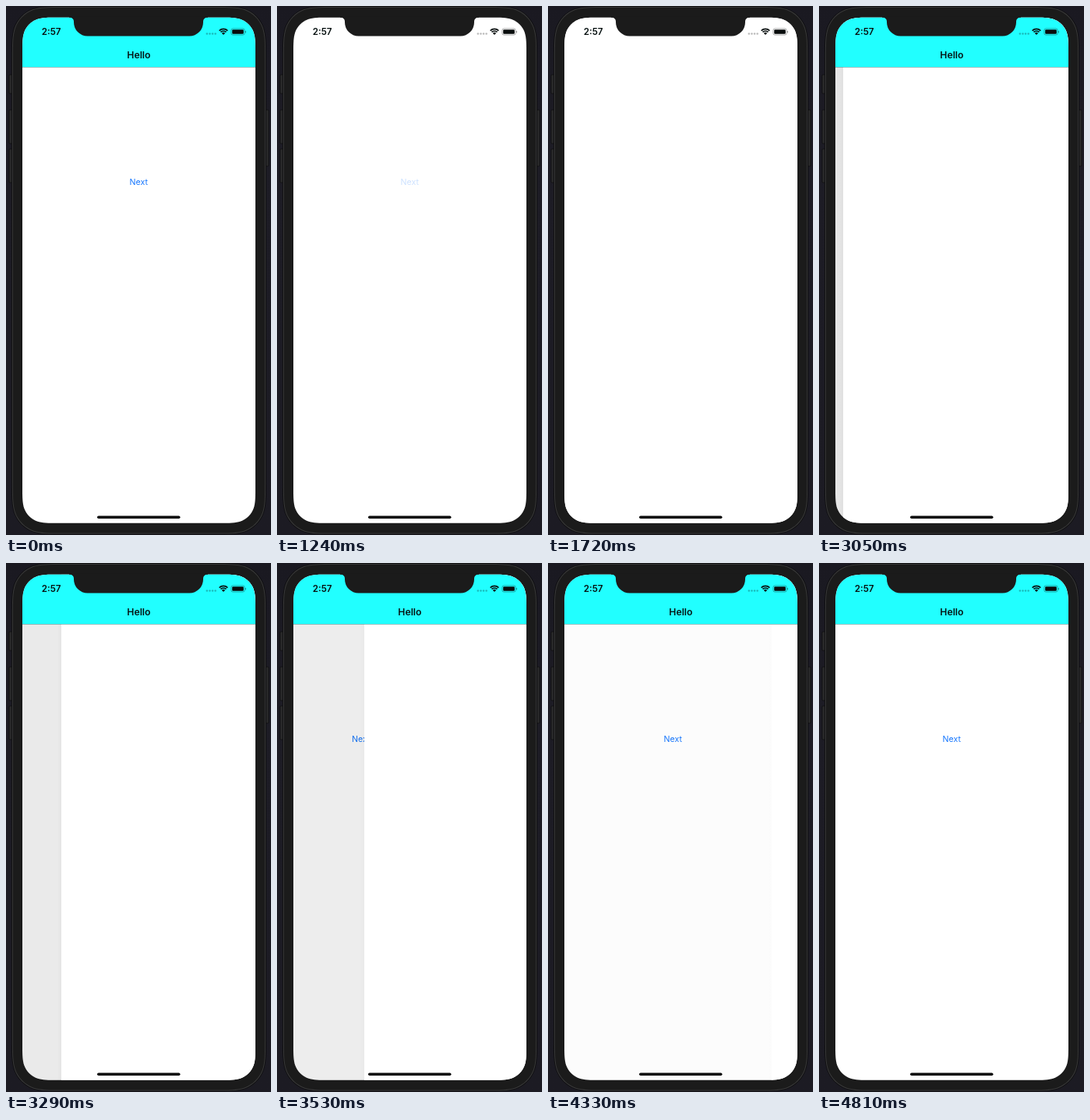
Animation, 340 px wide and 677 px high, one loop 5.06 s. Source, as an HTML page with a canvas:

```html
<!DOCTYPE html>
<html lang="en">
<head>
<meta charset="utf-8">
<title>Navigation swipe</title>
<style>
  html, body { margin: 0; width: 100%; height: 100%; overflow: hidden; background: #1c1b23; }
  canvas { display: block; width: 340px; height: 677px; }
</style>
</head>
<body>
<canvas id="stage"></canvas>
<script>
const W = 340, H = 677, LOOP = 5060, STEP = 80;
const PUSH = 1240, SWIPE = 3050, RELEASE = 4090, DONE = 4810;
const SCREEN = { x: 21, y: 14.7, w: 299, h: 647.1, r: 30 };
const BAR_BOTTOM = 78.2;
const FONT = 'Inter, Roboto, "Liberation Sans", sans-serif';

const canvas = document.getElementById('stage');
const ctx = canvas.getContext('2d');
const dpr = window.devicePixelRatio || 1;
canvas.width = W * dpr;
canvas.height = H * dpr;

// Finger drag: [ms since swipe start, page offset]
const DRAG = [[0, 10], [240, 50], [480, 91], [640, 131], [800, 158], [1040, 187]];

function dragAt(ms) {
  let i = 1;
  while (i < DRAG.length - 1 && ms > DRAG[i][0]) i++;
  const [t0, x0] = DRAG[i - 1], [t1, x1] = DRAG[i];
  return x0 + (x1 - x0) * (ms - t0) / (t1 - t0);
}

// cubic-bezier(.36, .66, .04, 1)
function pushEase(x) {
  if (x <= 0 || x >= 1) return x <= 0 ? 0 : 1;
  const bez = (u, a, b) => 3 * u * (1 - u) * (1 - u) * a + 3 * u * u * (1 - u) * b + u * u * u;
  let lo = 0, hi = 1;
  for (let i = 0; i < 24; i++) {
    const mid = (lo + hi) / 2;
    if (bez(mid, 0.36, 0.04) < x) lo = mid; else hi = mid;
  }
  return bez(lo, 0.66, 1);
}

function stateAt(t) {
  const w = SCREEN.w;
  if (t < PUSH || t >= DONE) return { bar: true, offset: w, ink: 1 };
  if (t < SWIPE) {
    const k = Math.min(Math.floor((t - PUSH) / STEP) / 6, 1);
    return { bar: false, offset: w * (1 - pushEase(k)), ink: 0.22 + 0.78 * k };
  }
  const ms = Math.floor((t - SWIPE) / STEP) * STEP;
  const drag = RELEASE - SWIPE;
  if (ms <= drag) return { bar: true, offset: dragAt(ms), ink: 1 };
  const left = 1 - (ms - drag) / (DONE - RELEASE);
  return { bar: true, offset: w - (w - dragAt(drag)) * left ** 3, ink: 1 };
}

function rect(x, y, w, h, color) {
  ctx.fillStyle = color;
  ctx.fillRect(x, y, w, h);
}

function rounded(x, y, w, h, r) {
  ctx.beginPath();
  ctx.roundRect(x, y, w, h, r);
}

function pill(x, y, w, h, r, color) {
  rounded(x, y, w, h, r);
  ctx.fillStyle = color;
  ctx.fill();
}

// Rounded box whose curvature eases in along each side
function smooth(x, y, w, h, r) {
  const corner = (cx, cy, ax, ay, bx, by) => {
    const p = (a, b) => [cx + (ax * a + bx * b) * r, cy + (ay * a + by * b) * r];
    ctx.lineTo(...p(1.529, 0));
    ctx.bezierCurveTo(...p(1.088, 0), ...p(0.868, 0), ...p(0.631, 0.075));
    ctx.bezierCurveTo(...p(0.373, 0.169), ...p(0.169, 0.373), ...p(0.075, 0.631));
    ctx.bezierCurveTo(...p(0, 0.868), ...p(0, 1.088), ...p(0, 1.529));
  };
  ctx.beginPath();
  corner(x, y, 0, 1, 1, 0);
  corner(x + w, y, -1, 0, 0, 1);
  corner(x + w, y + h, 0, -1, -1, 0);
  corner(x, y + h, 1, 0, 0, -1);
  ctx.closePath();
}

function text(str, x, y, size, weight, color) {
  ctx.font = `${weight} ${size}px ${FONT}`;
  ctx.textAlign = 'center';
  ctx.fillStyle = color;
  ctx.fillText(str, x, y);
}

function drawBody() {
  const bg = ctx.createLinearGradient(0, 0, 0, H);
  bg.addColorStop(0, '#1a1921');
  bg.addColorStop(0.3, '#1d1c25');
  bg.addColorStop(1, '#1c1b23');
  rect(0, 0, W, H, bg);

  const button = (x, y, h) => {
    pill(x, y, 5, h, 1, '#29292a');
    ctx.strokeStyle = '#0c0c0d';
    ctx.lineWidth = 0.7;
    ctx.stroke();
  };
  button(4, 88, 24);
  button(4, 133, 43);
  button(4, 183, 43);
  button(332, 133, 72);

  const shell = (inset, color) => {
    smooth(7 + inset, inset, 327 - 2 * inset, 676.5 - 2 * inset, 43.5 - inset);
    ctx.fillStyle = color;
    ctx.fill();
  };
  shell(0, '#0e0e0f');
  shell(0.9, '#39393a');
  shell(1.9, '#1b1b1b');
}

function drawPages(s) {
  const { x, y, w, h } = SCREEN;
  const away = 1 - s.offset / w;
  rect(x - 1, y - 1, w + 2, h + 2, '#fff');
  if (away < 1) {
    ctx.globalAlpha = s.ink;
    text('Next', 170.2 - 0.3 * w * away, 229, 10.6, 400, '#1576fe');
    ctx.globalAlpha = 1;
  }
  if (away > 0) {
    const edge = x + s.offset;
    rect(x, y, s.offset, h, `rgba(0,0,0,${0.1 * away})`);
    if (s.offset > 0) {
      const shade = ctx.createLinearGradient(edge - 6, 0, edge, 0);
      shade.addColorStop(0, 'rgba(0,0,0,0)');
      shade.addColorStop(1, `rgba(0,0,0,${0.03 * away})`);
      rect(edge - 6, y, 6, h, shade);
    }
    rect(edge, y, w - s.offset + 1, h, '#fff');
  }
  if (s.bar) {
    rect(x, y - 1, w, BAR_BOTTOM - y + 1, '#21ffff');
    rect(x, BAR_BOTTOM - 0.2, w, 0.8, 'rgba(0,0,0,.3)');
    text('Hello', 170.4, 67, 12.2, 600, '#061616');
  }
}

function drawNotch() {
  const top = SCREEN.y, bottom = 38.5;
  ctx.beginPath();
  ctx.moveTo(81, top - 1);
  ctx.lineTo(81, top);
  ctx.arcTo(87, top, 87, 22, 5);
  ctx.arcTo(87, bottom, 110, bottom, 17.5);
  ctx.arcTo(253, bottom, 253, 22, 17.5);
  ctx.arcTo(253, top, 259, top, 5);
  ctx.lineTo(259, top);
  ctx.lineTo(259, top - 1);
  ctx.fillStyle = '#1b1b1b';
  ctx.fill();
}

function drawStatus() {
  text('2:57', 58.2, 37, 11.6, 600, '#061010');

  for (let i = 0; i < 4; i++) pill(256.6 + i * 3.6, 34.3, 2.5, 2.5, 1.25, 'rgba(0,0,0,.27)');

  // Wi-Fi: two arcs over a wedge
  const cx = 279, cy = 37;
  const from = -Math.PI * 0.75, to = -Math.PI * 0.25;
  ctx.strokeStyle = ctx.fillStyle = '#0a1010';
  ctx.lineWidth = 1.7;
  for (const r of [7.6, 5]) {
    ctx.beginPath();
    ctx.arc(cx, cy, r, from, to);
    ctx.stroke();
  }
  ctx.beginPath();
  ctx.moveTo(cx, cy);
  ctx.arc(cx, cy, 3.1, from, to);
  ctx.fill();

  rounded(288.9, 28.9, 17.2, 8.2, 2.3);
  ctx.strokeStyle = 'rgba(0,0,0,.4)';
  ctx.lineWidth = 0.8;
  ctx.stroke();
  pill(290.2, 30.2, 14.6, 5.6, 1.2, '#080c0c');
  pill(306.9, 31.7, 1, 2.8, 0.5, 'rgba(0,0,0,.4)');
}

function draw(t) {
  const { x, y, w, h, r } = SCREEN;
  ctx.setTransform(dpr, 0, 0, dpr, 0, 0);
  drawBody();
  ctx.save();
  smooth(x, y, w, h, r);
  ctx.clip();
  drawPages(stateAt(t));
  drawStatus();
  pill(117, 652.5, 106.5, 3.6, 1.8, '#060606');
  ctx.restore();
  drawNotch();
}

const start = performance.now();
function tick() {
  draw((performance.now() - start) % LOOP);
  requestAnimationFrame(tick);
}
tick();
</script>
</body>
</html>
```
